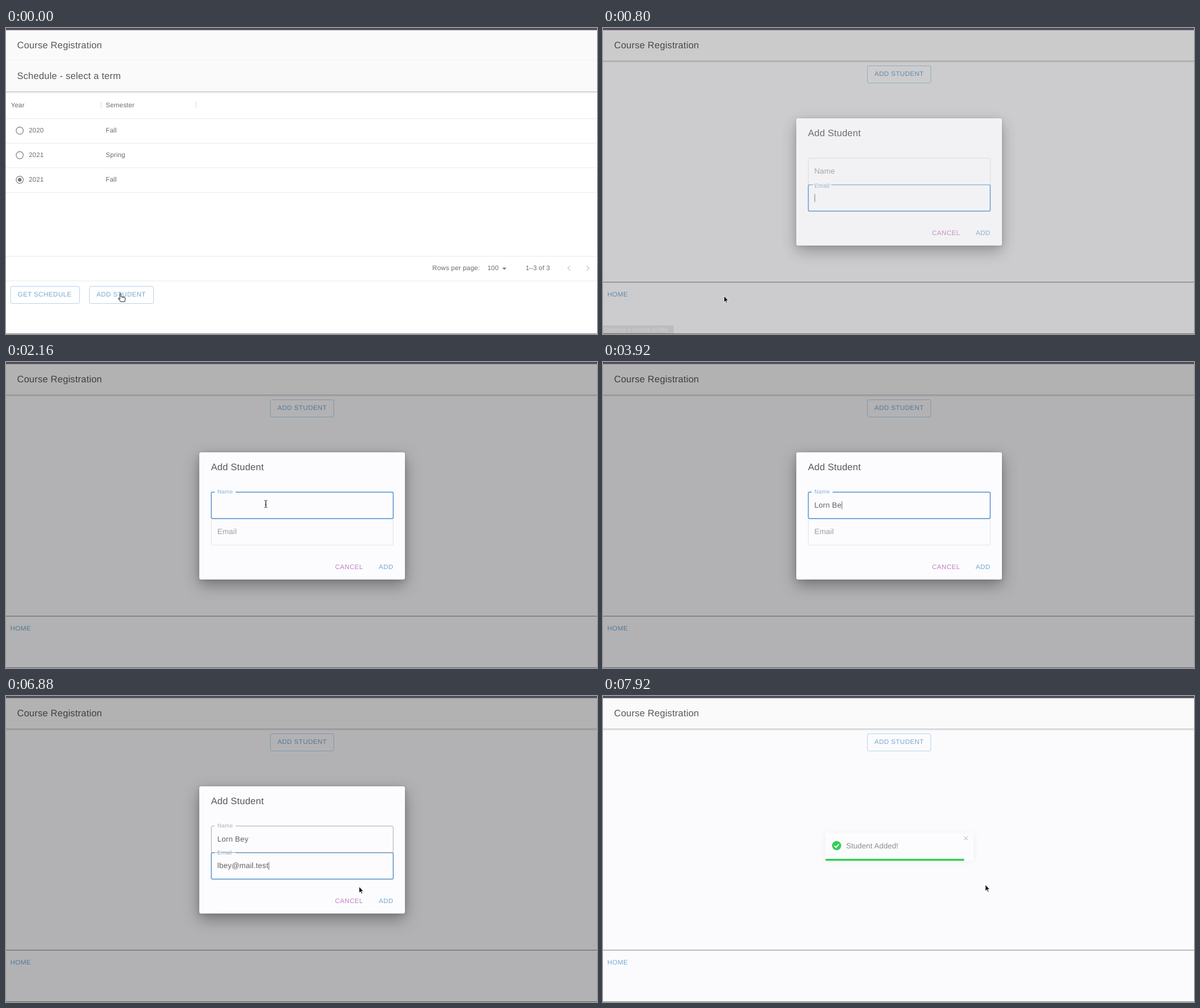
Write an HTML page that moves like this. It is 960 px wide and 498 px high and loops after 8 s.

```html
<!DOCTYPE html>
<html lang="en">
<head>
<meta charset="utf-8">
<title>Course Registration</title>
<style>
  html, body { margin: 0; height: 100%; overflow: hidden; background: #fff; }
  svg { display: block; width: 100vw; height: 100vh; }
  text { font-family: "Liberation Sans", Arial, sans-serif; text-rendering: geometricPrecision; white-space: pre; }
  .dialog { filter: drop-shadow(0 9px 13px rgba(0,0,0,.3)) drop-shadow(0 2px 4px rgba(0,0,0,.15)); }
  .toast { filter: drop-shadow(0 1px 4px rgba(0,0,0,.05)); }
</style>
</head>
<body>
<svg id="stage" viewBox="0 0 960 498" preserveAspectRatio="none"></svg>
<script>
const LOOP = 8000, NAME = 'Lorn Bey', EMAIL = 'lbey@mail.test';
const PAGE_AT = 720, NAME_CLICK = 1500, TAB_AT = 4240, ADD_CLICK = 7200, TOAST_AT = 7464;
const BLUE = '#76a8d2', FOCUS = '#5f98d0', INPUT = 12.3;

const clamp = v => Math.max(0, Math.min(1, v));
const lerp = (a, b, p) => a + (b - a) * p;
const part = (t, start, dur) => clamp((t - start) / dur);
const smooth = p => p * p * (3 - 2 * p);
const easeOut = p => 1 - (1 - p) ** 3;

// Value along [time, value] points, with easing between neighbours
function track(points, t, ease) {
  const i = points.findIndex(p => p[0] > t);
  if (i < 0) return points[points.length - 1][1];
  if (i === 0) return points[0][1];
  const [a, b] = [points[i - 1], points[i]];
  return lerp(a[1], b[1], ease((t - a[0]) / (b[0] - a[0])));
}

const text = (x, y, s, size, fill, gap = 0.15) =>
  `<text x="${x}" y="${y}" font-size="${size}" fill="${fill}" letter-spacing="${gap}">${s}</text>`;
const rect = (x, y, w, h, fill, more = '') =>
  `<rect x="${x}" y="${y}" width="${w}" height="${h}" fill="${fill}" ${more}/>`;
const line = (d, stroke, width = 1, more = '') =>
  `<path d="${d}" fill="none" stroke="${stroke}" stroke-width="${width}" ${more}/>`;
const circle = (x, y, r, fill, more = '') => `<circle cx="${x}" cy="${y}" r="${r}" fill="${fill}" ${more}/>`;
const title = (x, y, s) => text(x, y, s, 15.2, '#575757', 0.2);
const cell = (x, y, s) => text(x, y, s, 10.65, '#6a6a6a');
const label = (x, y, s, fill = BLUE) => text(x, y, s, 10.65, fill, 0.42);
const button = (x, y, w, s) =>
  rect(x + .5, y + .5, w, 28, 'none', 'rx="2.5" stroke="#bcd6ea"') + label(x + 12, y + 17, s);

const pen = document.createElement('canvas').getContext('2d');
pen.font = INPUT + 'px "Liberation Sans", Arial, sans-serif';
const inputWidth = s => pen.measureText(s).width + s.length * 0.15;

const chrome = () => rect(0, 0, 960, 3.5, '#504b5b') + title(18, 33, 'Course Registration');
const bottomEdge = () => rect(0, 497, 960, 1, '#8c8c8c');
const shadowEdge = y => [.2, .11, .05, .02].map((a, i) => rect(0, y + i, 960, 1, `rgba(0,0,0,${a})`)).join('');

function termPage(t) {
  let s = rect(0, 0, 960, 498, '#fff') + rect(0, 0, 960, 103, '#fafafa') + rect(0, 52, 960, 1, '#f3f3f3')
    + shadowEdge(103) + chrome() + title(18, 83, 'Schedule - select a term')
    + cell(8, 128.7, 'Year') + cell(162, 128.7, 'Semester')
    + line('M154.5 120v10M308.5 120v10', '#dcdcdc');
  for (const y of [147, 187, 227, 267, 371, 411]) s += rect(0, y, 960, 1, '#ececec');
  [['2020', 'Fall'], ['2021', 'Spring'], ['2021', 'Fall']].forEach(([year, term], i) => {
    const y = 167 + 40 * i;
    s += circle(22.3, y, 5.8, 'none', 'stroke="#858585" stroke-width="1.2"')
      + cell(37, y + 2.7, year) + cell(162, y + 2.7, term);
  });
  s += circle(22.3, 247, 3, '#757575')
    + text(692.5, 394, 'Rows per page:', 10.65, '#6a6a6a', 0.2) + cell(782, 394, '100') + cell(844, 394, '1–3 of 3')
    + '<path d="M806 390h7l-3.500 3.500z" fill="#777"/>'
    + line('M916.500 387l-4 4 4 4M943 387l4 4-4 4', '#a8a8a8')
    + button(7, 420, 112, 'GET SCHEDULE') + button(135, 420, 104, 'ADD STUDENT');
  const press = part(t, 480, 240);
  if (press) {
    s += `<clipPath id="press">${rect(135, 420, 105, 29, '#000', 'rx="3"')}</clipPath>`
      + circle(192, 434, 60 * easeOut(press), 'rgba(25,118,210,.16)', 'clip-path="url(#press)"');
  }
  return s + bottomEdge();
}

const studentPage = () => rect(0, 0, 960, 498, '#fbfbfd') + rect(0, 0, 960, 53, '#fafafa')
  + shadowEdge(53) + chrome() + button(429, 61, 103, 'ADD STUDENT')
  + rect(0, 413, 960, 1.2, '#9a9a9a') + label(7, 437, 'HOME') + bottomEdge();

// Outlined input whose label floats up into a gap in the top edge
function field(y, name, value, shrink, focused, idle, caret) {
  const gap = 17 * shrink, edge = focused ? FOCUS : idle;
  const body = `M${356 - gap} ${y}H335.500q-2 0-2 2v39q0 2 2 2h291.500q2 0 2-2v-39q0-2-2-2H${356 + gap}`;
  const ink = focused ? '#8ab2da' : shrink > .5 ? '#b0b0b2' : '#9b9b9b';
  let s = line(body, edge, focused ? 1.5 : 1)
    + text(343.3, lerp(y + 24.8, y + 2.7, shrink), name, lerp(INPUT, 9.2, shrink), ink)
    + text(343.3, y + 24.8, value, INPUT, '#626262');
  if (focused && caret) s += rect(343.5 + inputWidth(value), y + 15, 1, 13, '#777');
  return s;
}

function typed(t) {
  const n = Math.floor((t - 3190) / 120) + 1;
  const m = t < 5670 ? Math.floor((t - 4870) / 160) + 1 : 6 + Math.floor((t - 5670) / 90);
  return [NAME.slice(0, Math.max(0, n)), EMAIL.slice(0, Math.max(0, m))];
}

function dialog(t, fade) {
  const [name, email] = typed(t);
  const onName = t >= NAME_CLICK && t < TAB_AT || t >= ADD_CLICK;
  const caret = ![[2000, 2480], [2960, 3190], [4640, 4870], [5510, 5670], [6960, 7200]]
    .some(([a, b]) => t >= a && t < b);
  const float = start => easeOut(part(t, start, 200));
  const hover = t > 6900 ? rect(592.5, 320, 49, 28, 'rgba(25,118,210,.04)', 'rx="3"') : '';
  return `<g class="dialog" opacity="${Math.sqrt(fade)}">`
    + rect(314, 147, 334, 207, '#fcfcfe', 'rx="3"') + title(333, 175.5, 'Add Student')
    + field(255, 'Email', email, float(700) - float(NAME_CLICK) + float(TAB_AT), !onName, '#e4e4e6', caret)
    + field(211.7, 'Name', name, float(NAME_CLICK), onName, t > TAB_AT ? '#adadaf' : '#e0e0e2', caret)
    + hover + label(534.5, 337, 'CANCEL', '#c27fc4') + label(605.5, 337, 'ADD') + '</g>';
}

function toast(t) {
  const p = (t - TOAST_AT) / 700;
  const dy = track([[0, -3000], [.6, 25], [.75, -10], [.9, 5], [1, 0]], p, easeOut);
  const left = 241 * (1 - (t - TOAST_AT) / 6900);
  return `<g class="toast" transform="translate(0 ${dy})" opacity="${clamp(p / .6)}">`
    + rect(361, 223, 241, 46, '#fcfcfe', 'rx="3"') + rect(361.5, 265.5, left, 3.2, '#34cf56')
    + circle(379.5, 244, 7.5, '#34cf56') + line('M376 244.300l2.500 2.600 4.700-5.200', '#fff', 1.8)
    + text(395, 248, 'Student Added!', 12.2, '#8c8c8c', 0.1)
    + line('M586.500 229l6 6m0-6l-6 6', '#a5a5a5') + '</g>';
}

const status = opacity => `<g opacity="${opacity}">` + rect(0, 484, 115, 14, 'rgba(0,0,0,.08)')
  + text(2, 494, 'Opening a student profile', 9, 'rgba(255,255,255,.3)', 0.1) + '</g>';

const shapes = {
  arrow: '<path d="M0 0v10.500l2.400-2.200 1.600 3.700 1.700-.8-1.600-3.500h3.200z" fill="#111" stroke="#fff" stroke-width=".8"/>',
  beam: line('M-2.500-6q2.500 0 2.500 2v8q0 2-2.500 2M2.500-6Q0-6 0-4v8q0 2 2.500 2M-1.500 1h3', '#444', 1),
  hand: '<path d="M-1 1q1-2 2 0v4l5.500 1.200q1.500.5 1.200 2l-.9 5.300H.500l-4-5q.5-1.700 2.500.2z" fill="#fff" stroke="#444" stroke-width="1.100"/>'
    + line('M2.800 5.500v2M4.900 6v2', '#555', .8)
};

function cursor(t) {
  if (t >= 3190 && t < 6500) return '';
  const x = track([[80, 186], [560, 196.5], [800, 196.5], [1360, 422], [6500, 422], [7040, 613.5], [7400, 613.5], [7840, 621]], t, smooth);
  const y = track([[80, 432], [560, 436], [800, 436], [1360, 231], [6500, 231], [7040, 331], [7400, 331], [7840, 307]], t, smooth);
  const inField = x > 333 && x < 629 && y > 211 && y < 298;
  const onAdd = x > 592 && x < 642 && y > 320 && t < 7400;
  const shape = t < PAGE_AT || onAdd ? 'hand' : inField && t < 7400 ? 'beam' : 'arrow';
  return `<g transform="translate(${x} ${y})">${shapes[shape]}</g>`;
}

function draw(t) {
  const fade = smooth(part(t, 665, 225)) - smooth(part(t, 7204, 195));
  let s = t < PAGE_AT ? termPage(t) : studentPage();
  if (t >= PAGE_AT && fade > 0) s += rect(0, 3.5, 960, 494.5, '#000', `opacity="${.29 * fade}"`) + dialog(t, fade);
  if (t >= TOAST_AT) s += toast(t);
  const tip = part(t, 160, 160) - part(t, 820, 180);
  if (tip > 0) s += status(tip);
  return s + cursor(t);
}

const stage = document.getElementById('stage');
const begin = performance.now();
function frame() {
  stage.innerHTML = draw((performance.now() - begin) % LOOP);
  requestAnimationFrame(frame);
}
frame();
</script>
</body>
</html>
```
